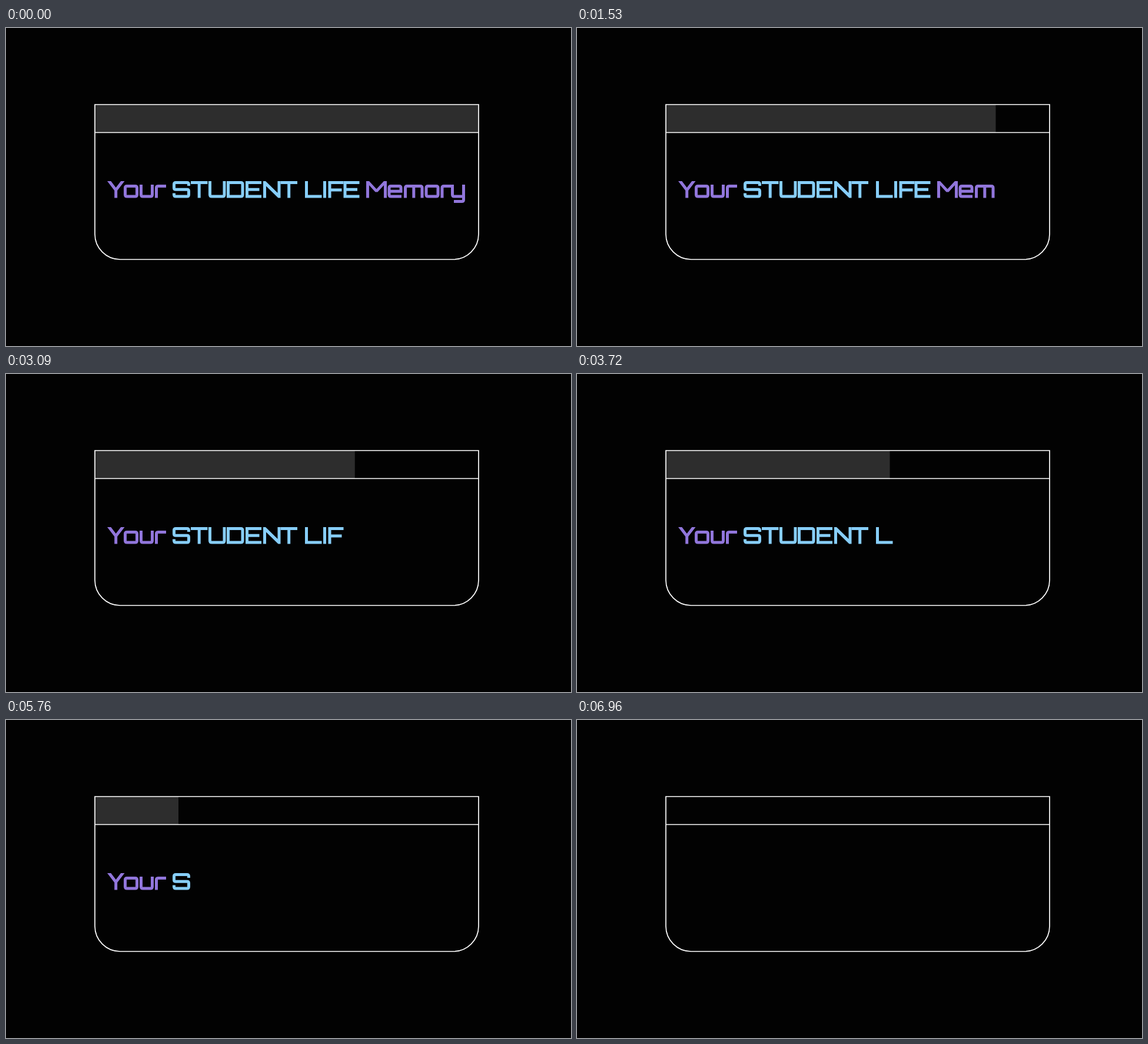
Animation of 960x540 px, one loop 6.99 s. Source, as an HTML page:

```html
<!DOCTYPE html>
<html lang="en">
<head>
<meta charset="utf-8">
<title>Student life memory</title>
<style>
  html, body { margin: 0; width: 100%; height: 100%; overflow: hidden; background: #020202; }
  svg { display: block; width: 100vw; height: 100vh; }
  text { font: 500 40px "DejaVu Sans", sans-serif; fill: none; white-space: pre; }
</style>
</head>
<body>
<svg viewBox="0 0 960 540">
  <rect width="960" height="540" fill="#020202"/>
  <rect id="bar" x="151" y="130" width="652" height="47" fill="#2d2d2d"/>
  <path d="M151 130H803V350A43 43 0 0 1 760 393H194A43 43 0 0 1 151 350ZM151 177.5H803"
        fill="none" stroke="#fff" stroke-width="1.7"/>
  <!-- selectable text beneath the drawn lettering -->
  <text id="label" x="172" y="288"></text>
  <g id="lettering"></g>
</svg>
<script>
const LOOP = 6990;
const MESSAGE = "Your STUDENT LIFE Memory";
const PURPLE = "#9176db", BLUE = "#87cefa";

// Wide techno letterforms: cap height 28.5, x-height line at 6, drawn from (0, 0).
const strokes = {
  S: "M27.5 8V5.5Q27.5 2.5 24.5 2.5H5.5Q2.5 2.5 2.5 5.5V11.5Q2.5 14.3 5.5 14.3H24.5Q27.5 14.3 27.5 17V23Q27.5 26 24.5 26H5.5Q2.5 26 2.5 23V20.5",
  T: "M0 2.5H28.5M14.2 2.5V28.5",
  U: "M2.5 0V23Q2.5 26 5.5 26H24Q27 26 27 23V0",
  D: "M2.5 2.5H24Q27 2.5 27 5.5V23Q27 26 24 26H2.5Z",
  E: "M27 2.5H2.5V26H27M2.5 14.3H23.5",
  L: "M2.5 0V26H28.5",
  I: "M2.5 0V28.5",
  F: "M26 2.5H2.5V28.5M2.5 15H23",
  o: "M5.5 8.5H19.5Q22.5 8.5 22.5 11.5V23Q22.5 26 19.5 26H5.5Q2.5 26 2.5 23V11.5Q2.5 8.5 5.5 8.5Z",
  u: "M2.5 6V23Q2.5 26 5.5 26H18.5Q21.5 26 21.5 23V6",
  r: "M2.5 28.5V11.5Q2.5 8.5 5.5 8.5H19",
  e: "M2.5 17.3H22.5V11.5Q22.5 8.5 19.5 8.5H5.5Q2.5 8.5 2.5 11.5V23Q2.5 26 5.5 26H23.5",
  m: "M2.5 28.5V11.5Q2.5 8.5 5.5 8.5H28Q31 8.5 31 11.5V28.5M16.8 8.5V28.5",
  y: "M2.5 6V23Q2.5 26 5.5 26H21.5M21.5 6V31.5Q21.5 34.5 18.5 34.5H5"
};
const solids = {
  Y: "M0 0H6.3L14.7 11L23.2 0H29.5L17.2 16V28.5H12.2V16Z",
  N: "M0 28.5V0H4L24.5 20V0H29.5V28.5H25.5L5 8.5V28.5Z",
  M: "M0 28.5V0H5L17.5 13.5L30 0H35V28.5H30V7L19.5 18.5H15.5L5 7V28.5Z"
};

const words = [
  { text: "Your", color: PURPLE, x: [172, 200, 227, 253] },
  { text: "STUDENT", color: BLUE, x: [283, 314, 344, 375, 407, 437, 466.5] },
  { text: "LIFE", color: BLUE, x: [508, 539, 547.5, 573.5] },
  { text: "Memory", color: PURPLE, x: [612, 648.5, 676, 711.5, 738.5, 756] }
];

const byId = id => document.getElementById(id);
const bar = byId("bar"), label = byId("label"), lettering = byId("lettering");

function drawLetter(char, x, color) {
  const path = document.createElementNS("http://www.w3.org/2000/svg", "path");
  const solid = char in solids;
  path.setAttribute("d", solid ? solids[char] : strokes[char]);
  path.setAttribute("transform", `translate(${x} 260)`);
  path.setAttribute("fill", solid ? color : "none");
  if (!solid) {
    path.setAttribute("stroke", color);
    path.setAttribute("stroke-width", 5);
  }
  return lettering.appendChild(path);
}

const letters = words.flatMap(({ text, color, x }) =>
  [...text].map((char, i) => drawLetter(char, x[i], color)));

// Right end of the bar after a number of deleted letters.
const barStops = [[0, 803], [3, 711.5], [5, 654], [9, 531.5], [12, 435.5], [13, 399.5], [16, 293], [18, 230], [21, 151]];

function barEnd(deleted) {
  const i = Math.max(1, barStops.findIndex(([n]) => n >= deleted));
  const [n0, x0] = barStops[i - 1], [n1, x1] = barStops[i];
  return x0 + (x1 - x0) * (deleted - n0) / (n1 - n0);
}

// The last word starts going slowly, then the pace picks up.
const deleteTime = i => i < 5 ? 800 + 358 * i : 2590 + 290 * (i - 5);

function render(time) {
  const deleted = letters.filter((_, i) => deleteTime(i) <= time).length;
  const left = letters.length - deleted;
  letters.forEach((letter, i) => letter.setAttribute("visibility", i < left ? "visible" : "hidden"));
  bar.setAttribute("width", barEnd(deleted) - 151);

  let seen = 0;
  label.textContent = [...MESSAGE].filter(c => c === " " ? seen < left : seen++ < left).join("");
}

function tick() {
  render(performance.now() % LOOP);
  requestAnimationFrame(tick);
}
tick();
</script>
</body>
</html>
```
